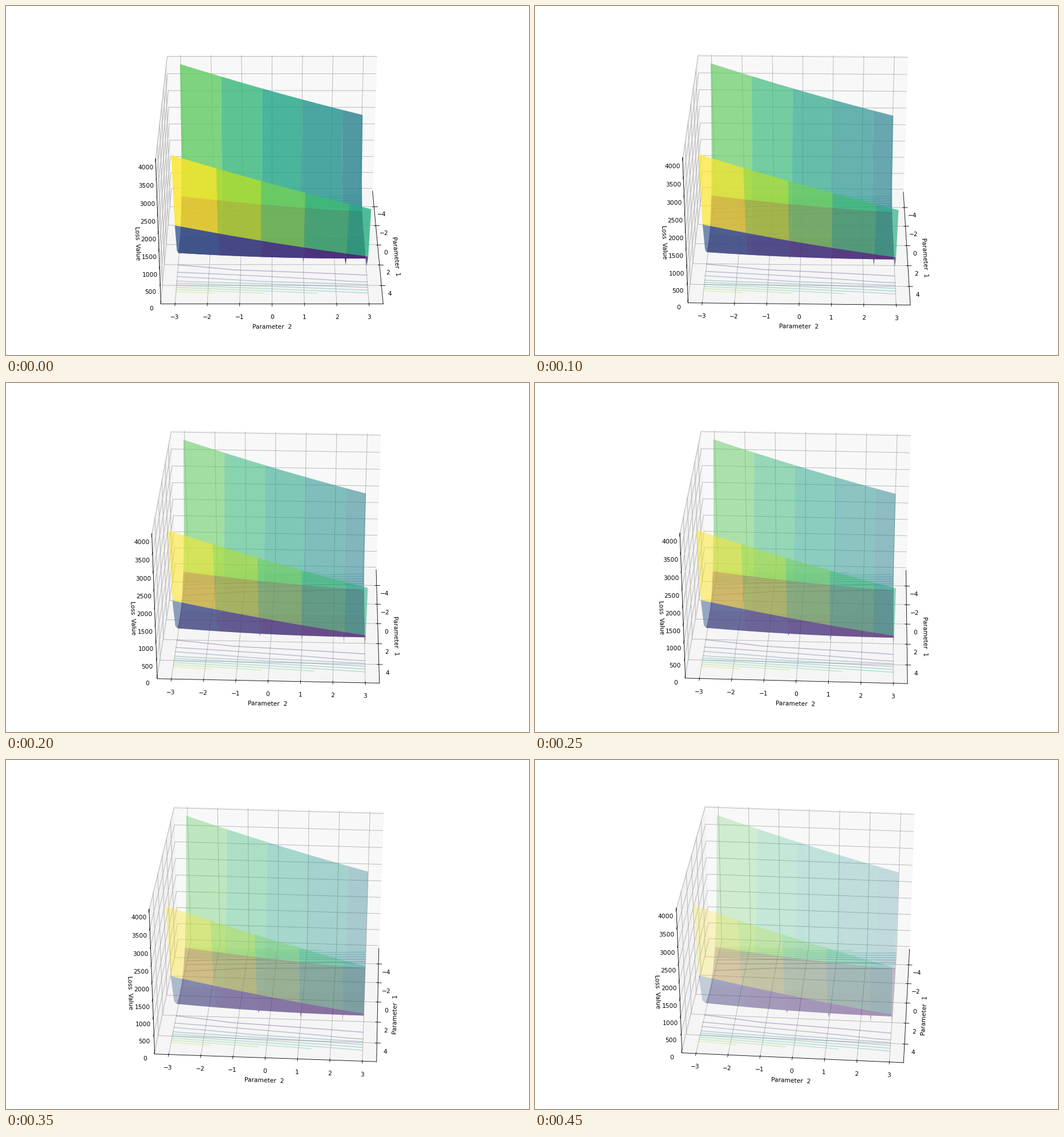
A matplotlib script that plays this animation: 917 px wide and 611 px high, repeating every 500 ms.

```python
import numpy as np
import matplotlib.pyplot as plt
from matplotlib.animation import FuncAnimation

WIDTH, HEIGHT, DPI = 917, 611, 76.4
FRAMES, INTERVAL = 10, 50
PAD = 10.8 * DPI / 72

plt.rcParams["font.family"] = "DejaVu Sans"


def loss(a, b):
    return (1 - a) ** 2 + 5 * (b - a ** 2) ** 2


def with_margin(low, high):
    """Widen a range by 1/48 on each side."""
    pad = (high - low) / 48
    return low - pad, high + pad


fig = plt.figure(figsize=(WIDTH / DPI, HEIGHT / DPI), dpi=DPI)
ax = fig.add_axes(
    [PAD / WIDTH, PAD / HEIGHT, 1 - 2 * PAD / WIDTH, 1 - 2 * PAD / HEIGHT],
    projection="3d",
)

P1, P2 = np.meshgrid(np.linspace(-5, 5, 10), np.linspace(-3, 3, 10))
Z = loss(P1, P2)

surface = ax.plot_surface(P1, P2, Z, rstride=2, cstride=2, cmap="viridis",
                          linewidth=0, antialiased=True)
ax.contour(P1, P2, Z, levels=10, zdir="z", offset=0, cmap="viridis", alpha=0.3)

ax.set_xlim(with_margin(-5.5, 5.5))
ax.set_ylim(with_margin(-3.3, 3.3))
ax.set_zlim(with_margin(Z.min(), Z.max()))
ax.set_xlabel("Parameter  1")
ax.set_ylabel("Parameter  2")
ax.set_zlabel("Loss  Value")


def update(i):
    # the tiny offset keeps the side pane on the left when seen head-on
    ax.view_init(elev=30, azim=0.5 * i + 1e-4)
    surface.set_alpha(0.8 - 0.06 * i)
    return []


anim = FuncAnimation(fig, update, frames=FRAMES, interval=INTERVAL,
                     init_func=lambda: update(0), repeat=True, repeat_delay=0)
plt.show()
```
